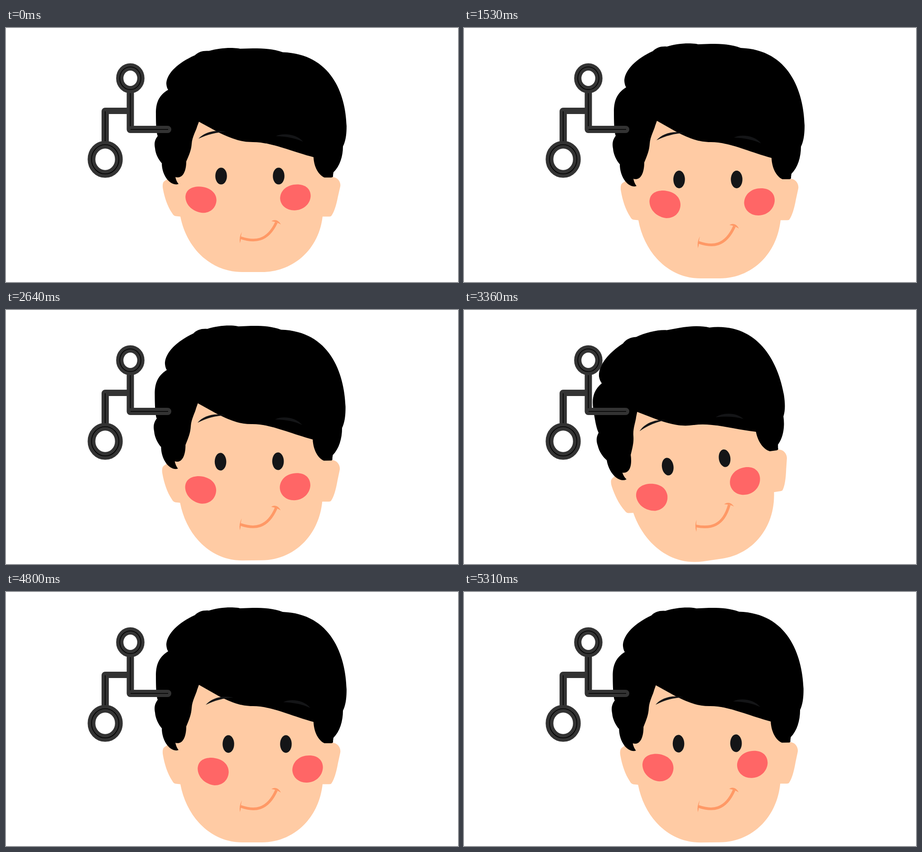
These frames come from a looping animation (998x561 px, 5490 ms). An HTML page:

```html
<!DOCTYPE html>
<html lang="en">
<head>
<meta charset="utf-8">
<title>Nodding head</title>
<style>
  html, body { margin: 0; width: 100%; height: 100%; overflow: hidden; background: #fff; }
  svg { display: block; width: 100vw; height: 100vh; }
</style>
</head>
<body>
<svg viewBox="0 0 998 561">
  <g id="head">
    <path fill="#ffcba4" d="M347 346 Q349 342 354 340 L385 300 L395 230 L440 190 L700 240 L715 325 L722 333
      C733 334 740 345 738 355 L733 378 C729 400 724 415 719 422 Q718 424.500 714 424.500 L699 424.500
      C690 505 630 553 565 553 L522 553 C450 553 398 495 385 424.500 L375 423.500 Q370 423 367 417
      C356 400 350 380 346.500 360 Q345 352 347 346Z"/>
    <path d="M426 205 L470 230 C495 242 515 252 545 252 C585 252 625 272 679 287
      C680 310 690 328 703 334 L718 334 Q723 334 722 329 L723 322 C737 308 744 285 744 262
      C750 250 752 235 752 215 C750 140 718 48 611 44 C590 36 570 35 545 35 L517 36
      C500 32 470 34 448 41 C435 40 425 43 417 51 C380 68 356 92 354 115 C354 122 356 128 358 131
      C335 145 331 165 331 185 C331 215 332 230 335 238 C326 250 328 260 329 266
      C330 280 337 293 344 301 C344 325 358 350 377 350 L381 349 Q376 343 374 333
      C390 338 398 320 398 297 C405 280 409 270 410 256 C411 240 420 225 422 216Z"/>
    <g id="eyes" fill="#141517">
      <ellipse cx="475" cy="334.500" rx="12.800" ry="19.500"/>
      <ellipse cx="602" cy="334.500" rx="12.800" ry="19.500"/>
      <path d="M425 248 C437 234 460 226 486 232 C465 233 445 238 425 248Z"/>
      <path d="M596 242 C612 234 642 237 656 255 C640 247 620 243 596 242Z"/>
    </g>
    <g id="cheeks" fill="#f66">
      <path d="M409.500 383 C410 367 422 359 440 359 C462 360 478 372 478 391
        C477 408 465 420 447 420 C428 418 410 404 409.500 383Z"/>
      <path d="M618.500 386 C619 367 635 354 656 354 C674 354 686 364 686 381
        C685 400 669 414 650 414 C632 414 619 402 618.500 386Z"/>
    </g>
    <g id="smile" fill="#f96">
      <path fill="none" stroke="#f96" stroke-width="6" d="M518 473.500 C548 484 577 483 597 438"/>
      <path d="M521 460 Q514 472 516.500 486 Q519 480 518.500 473 Q519 466 521 460Z"/>
      <path d="M586 435 Q599 428 607 443 Q598 437 586 435Z"/>
    </g>
    <circle id="oh" cx="586.700" cy="484" r="18" fill="#930"/>
  </g>
  <g fill="none" stroke="#333" stroke-width="16" stroke-linejoin="round">
    <path stroke-width="14" d="M219 183 H274"/>
    <path d="M219 256 V184 H222"/>
    <path stroke-linecap="round" d="M274.500 140 V224 H357"/>
    <ellipse cx="274.500" cy="111" rx="23.300" ry="25"/>
    <ellipse cx="219" cy="290" rx="30.200" ry="32.300" stroke-width="17"/>
    <g stroke="#000" stroke-width="1.600">
      <path d="M219 184 V250 M274.500 144 V217 M275 224 H358"/>
      <ellipse cx="274.500" cy="111" rx="23.300" ry="25"/>
      <ellipse cx="219" cy="290" rx="30.200" ry="32.300"/>
    </g>
  </g>
</svg>
<script>
const LOOP = 5490;
const rest = { turn: 0, squash: 1, lift: 0, eyes: [0, 0], cheeks: [0, 0], open: false };
const squat = { ...rest, squash: 0.954, eyes: [0, -3.8], cheeks: [-13.3, -4] };
const glance = { ...rest, cheeks: [-13, 7] };
const speak = { ...rest, eyes: [16, 1.3], cheeks: [4.5, 7], open: true };
const look = { ...speak, cheeks: [13.7, 7], open: false };

// Each pose holds until the next one starts.
const steps = [
  [0, squat],
  [930, { ...squat, lift: 11 }],
  [1500, { ...rest, squash: 0.977, lift: 5, eyes: [0, -2], cheeks: [-6, -2] }],
  [1530, rest],
  [2100, { ...rest, turn: 6.8 }],
  [2640, { ...glance, turn: -0.45 }],
  [3360, { ...glance, turn: -8.4 }],
  [3930, glance],
  [4230, { ...speak, turn: -5.2 }],
  [4530, speak],
  [4770, { ...look, cheeks: [9, 7] }],
  [4800, look],
  [5040, { ...look, lift: -6 }],
  [5070, { ...look, lift: -12 }],
  [5100, { ...look, lift: -18 }],
  [5310, { ...rest, turn: -0.45, cheeks: [-14.5, -2.5] }]
];

const el = id => document.getElementById(id);
const move = (id, [x, y]) => el(id).setAttribute("transform", `translate(${x} ${y})`);
const show = (id, on) => el(id).setAttribute("visibility", on ? "visible" : "hidden");

function pose(p) {
  el("head").setAttribute("transform",
    `translate(0 ${p.lift + 250 * (1 - p.squash)}) scale(1 ${p.squash}) rotate(${p.turn} 540 512)`);
  move("eyes", p.eyes);
  move("cheeks", p.cheeks);
  show("smile", !p.open);
  show("oh", p.open);
}

const start = performance.now();
function tick() {
  const t = (performance.now() - start) % LOOP;
  pose(steps.findLast(([at]) => at <= t)[1]);
  requestAnimationFrame(tick);
}
tick();
</script>
</body>
</html>
```
